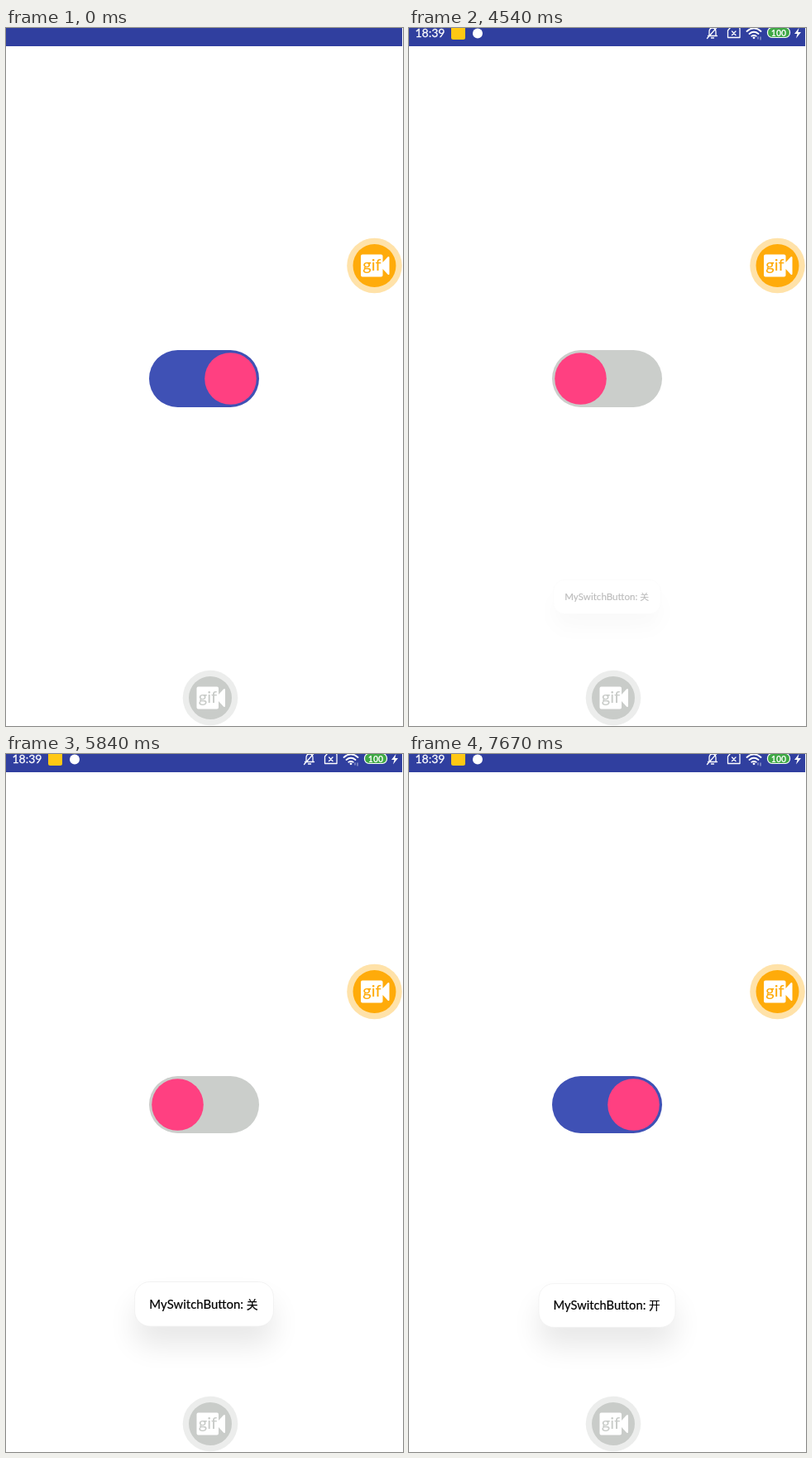
An HTML page for the animation above (8000 ms loop, 480 by 843 pixels).

```html
<!DOCTYPE html>
<html lang="en">
<head>
<meta charset="utf-8">
<title>Switch with toast</title>
<style>
  html, body { margin: 0; width: 100%; height: 100%; overflow: hidden; background: #fff; }
  svg { display: block; width: 100%; height: 100%; }
  text { font-family: Lato, "Open Sans", sans-serif; }
  .han { font-family: "Noto Sans CJK SC", "Noto Sans CJK", sans-serif; }
  .line { fill: none; stroke: #fff; stroke-width: 1.3; stroke-linecap: round; stroke-linejoin: round; }
</style>
</head>
<body>
<svg viewBox="0 0 480 843" preserveAspectRatio="none">
  <defs>
    <filter id="soft" x="-60%" y="-160%" width="220%" height="420%">
      <feGaussianBlur stdDeviation="18"/>
    </filter>
    <clipPath id="floor"><rect width="480" height="758"/></clipPath>
    <g id="recorder">
      <circle r="33.3" opacity=".35"/>
      <circle r="26"/>
      <path d="M-14.5-13.5H8a2 2 0 0 1 2 2V-4L16-10.5Q18-12 18-9.500V9.500Q18 12 16 10.500L10 4V11.500a2 2 0 0 1-2 2H-14.500a2 2 0 0 1-2-2V-11.500a2 2 0 0 1 2-2Z" fill="#fff"/>
      <text x="-3" y="6" font-size="20" font-weight="500" text-anchor="middle">gif</text>
    </g>
  </defs>

  <rect width="480" height="843" fill="#fff"/>
  <rect width="479" height="22" fill="#303f9f"/>

  <g id="status" fill="#fff">
    <text x="7.500" y="11" font-size="14" stroke="#fff" stroke-width=".3">18:39</text>
    <rect x="51" y="-3" width="17" height="17" rx="2.500" fill="#ffc814"/>
    <circle cx="83" cy="6.500" r="6"/>
    <g class="line">
      <path d="M361.500 9.500H372.500M363 9V4.500Q363 0 367 0T371 4.500V9M365.500 12H368.500M372.500-1L360.500 12.500"/>
      <path d="M389-1H399Q400 0 400 1V11.500H385.500V3ZM390.500 4L395 8.500M395 4L390.500 8.500"/>
      <path d="M408.500 4Q417-3.500 425.500 4M411.500 7Q417 2.500 422.500 7M414.300 9.800Q417 8 419.700 9.800" stroke-width="1.800"/>
    </g>
    <circle cx="417" cy="11.800" r="1.400"/>
    <path d="M422 10.500V13.500" stroke="#fff" opacity=".65"/>
    <path id="arrow" d="M425 10.500V14.500" stroke="#fff" opacity=".65"/>
    <rect x="433.500" y="-.5" width="27" height="12" rx="5.500" fill="#3fa845" stroke="#fff" stroke-width="1.200"/>
    <text x="447" y="9.600" font-size="10.500" font-weight="700" text-anchor="middle">100</text>
    <path d="M471.500 0L466 7H469.500L468 12.500L474 5H470.300Z"/>
  </g>

  <rect id="track" x="173" y="389" width="133" height="69" rx="34.500"/>
  <circle id="knob" cy="423.500" r="31.300" fill="#ff4081"/>

  <g clip-path="url(#floor)">
    <g id="toast">
      <rect x="152" y="656" width="175" height="56" rx="18" opacity=".09" filter="url(#soft)"/>
      <rect x="152" y="632" width="175" height="56" rx="19" fill="#fff" stroke="#eee" stroke-width=".7"/>
      <g stroke="#000" stroke-width=".2">
        <text x="170.500" y="665.500" font-size="15.600">MySwitchButton:</text>
        <text id="word" class="han" x="293" y="665.500" font-size="14.500"></text>
      </g>
    </g>
  </g>

  <use href="#recorder" x="445.500" y="287" fill="#ffab0a"/>
  <use href="#recorder" x="247" y="809" fill="#c9ccc9"/>
</svg>

<script>
const LOOP = 8000;
const PIVOT = { x: 239.5, y: 765 };
const el = id => document.getElementById(id);
const [status, arrow, track, knob, toast, word] =
  ["status", "arrow", "track", "knob", "toast", "word"].map(el);

// [time, opacity], held until the next entry
const STATUS = [[0, 0], [90, .25], [190, .5], [290, .8], [490, 1]];

// [progress, scale, opacity], straight lines between entries
const POP = [
  [0, .7, .1], [.19, .83, .6], [.37, .914, 1], [.5, .985, 1],
  [.57, 1, 1], [.68, 1, 1], [.85, .962, 1], [1, .943, 1]
];

const TOASTS = [
  { from: 4440, to: 6350, fade: 6150, enter: 1600, step: 100, word: "关" },
  { from: 6800, to: LOOP, fade: LOOP, enter: 570, step: 95, word: "开" }
];

const held = (table, t) => table.filter(row => row[0] <= t).pop()[1];
const within = (t, a, b) => t >= a && t < b;

function pose(u) {
  const i = Math.max(1, POP.findIndex(row => row[0] >= u));
  const a = POP[i - 1], b = POP[i];
  const k = (u - a[0]) / (b[0] - a[0]);
  return [1, 2].map(n => a[n] + (b[n] - a[n]) * k);
}

function drawToast(t) {
  const now = TOASTS.find(item => within(t, item.from, item.to));
  toast.style.display = now ? "" : "none";
  if (!now) return;
  const age = Math.floor((t - now.from) / now.step) * now.step;
  const [scale, alpha] = pose(Math.min(1, age / now.enter));
  const { x, y } = PIVOT;
  toast.setAttribute("transform", `translate(${x} ${y}) scale(${scale}) translate(${-x} ${-y})`);
  toast.setAttribute("opacity", t >= now.fade ? .6 : alpha);
  word.textContent = now.word;
}

function draw(t) {
  const off = within(t, 3940, 6650);
  status.setAttribute("opacity", held(STATUS, t));
  arrow.style.display = within(t, 3460, 6350) || t >= 7670 ? "" : "none";
  track.setAttribute("fill", off ? "#cbcecb" : "#3f51b5");
  knob.setAttribute("cx", off ? 207.5 : 271.5);
  drawToast(t);
}

const start = performance.now();
function tick() {
  draw((performance.now() - start) % LOOP);
  requestAnimationFrame(tick);
}
tick();
</script>
</body>
</html>
```
